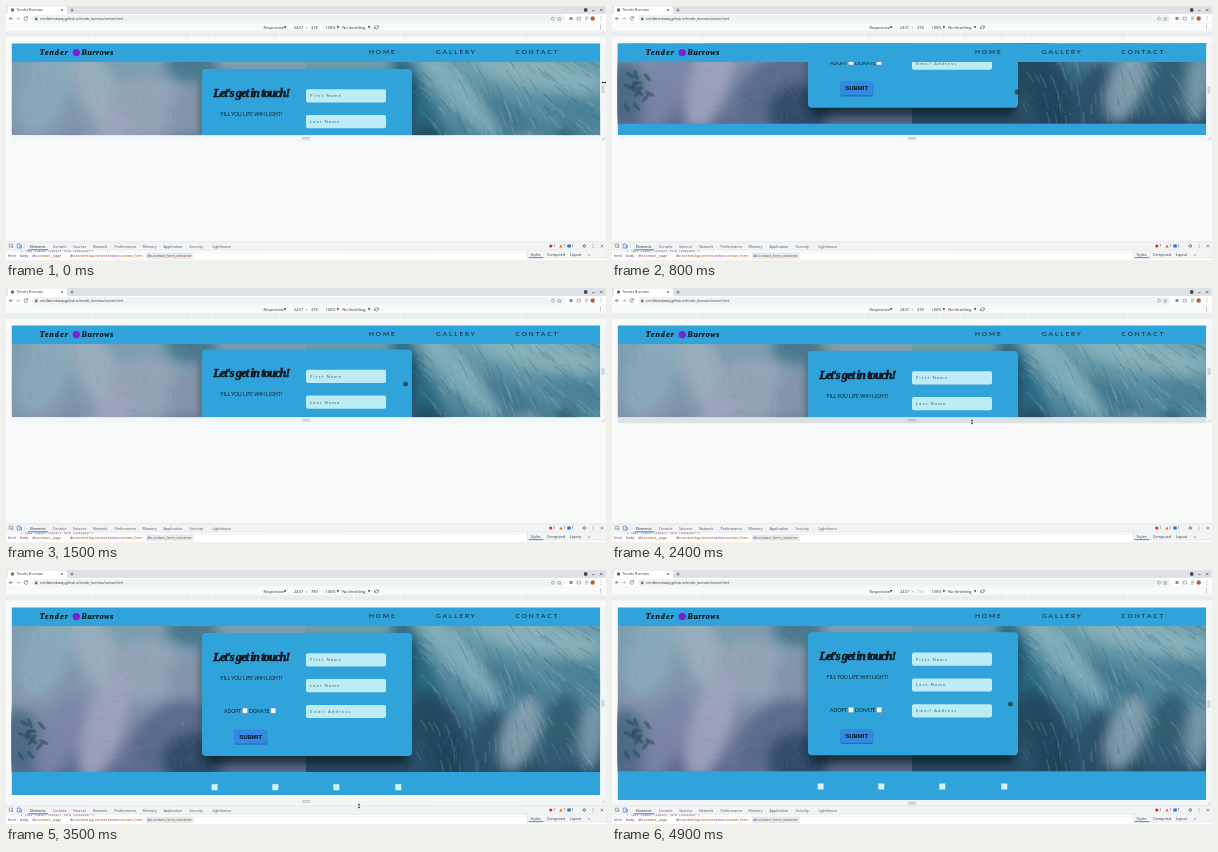
An HTML page for the animation above (5 s loop, 600 by 254 pixels).

```html
<!DOCTYPE html>
<html lang="en">
<head>
<meta charset="utf-8">
<title>Tender Burrows</title>
<style>
  html, body { margin: 0; width: 100%; height: 100%; overflow: hidden; background: #f8faf9; }
  svg { display: block; width: 100vw; height: 100vh; }
  text { font-family: "Open Sans", sans-serif; white-space: pre; }
  .lato { font-family: Lato, sans-serif; }
  .script { font-family: "Liberation Serif", serif; font-weight: bold; font-style: italic; }
  .bold { font-family: "Liberation Sans", sans-serif; font-weight: bold; }
  .mono { font-family: "DejaVu Sans Mono", monospace; }
</style>
</head>
<body>
<svg id="stage" viewBox="0 0 600 254">
  <defs>
    <clipPath id="view"><rect id="viewRect" x="5.8" y="37.5" width="588.4" height="91"/></clipPath>
    <clipPath id="photoClip"><rect x="5" y="56" width="590" height="147"/></clipPath>
    <clipPath id="codeClip"><rect x="0" y="244.2" width="521" height="2"/></clipPath>
    <filter id="soft" x="-10%" y="-20%" width="120%" height="140%"><feGaussianBlur stdDeviation="6"/></filter>
    <filter id="shade" x="-20%" y="-20%" width="140%" height="150%"><feGaussianBlur stdDeviation="6"/></filter>
    <linearGradient id="leftCoat" x2="0" y2="1">
      <stop offset="0" stop-color="#7d9fb1"/>
      <stop offset=".5" stop-color="#8495ae"/>
      <stop offset="1" stop-color="#5f6c90"/>
    </linearGradient>
    <linearGradient id="rightCoat" x2="0" y2="1">
      <stop offset="0" stop-color="#6c9fad"/>
      <stop offset=".5" stop-color="#4b8097"/>
      <stop offset="1" stop-color="#2a4d66"/>
    </linearGradient>
  </defs>
  <g id="chrome"></g>
  <g clip-path="url(#view)">
    <g id="page"></g>
    <g id="header"></g>
  </g>
  <g id="grips"></g>
  <g id="tools"></g>
  <g id="cursors"></g>
</svg>
<script>
const NS = "http://www.w3.org/2000/svg";
const $ = id => document.getElementById(id);
const BLUE = "#31a3db";

function add(parent, tag, attrs, content) {
  const node = document.createElementNS(NS, tag);
  for (const key in attrs) node.setAttribute(key, attrs[key]);
  if (content !== undefined) node.textContent = content;
  parent.appendChild(node);
  return node;
}
const rect = (g, x, y, width, height, fill, more) => add(g, "rect", { x, y, width, height, fill, ...more });
const disc = (g, cx, cy, r, fill, more) => add(g, "circle", { cx, cy, r, fill, ...more });
const oval = (g, cx, cy, rx, ry, turn, fill, more) =>
  add(g, "ellipse", { cx, cy, rx, ry, fill, transform: `rotate(${turn} ${cx} ${cy})`, ...more });
const line = (g, d, stroke, width = .6, more) =>
  add(g, "path", { d, stroke, "stroke-width": width, fill: "none", ...more });
const label = (g, x, y, size, str, fill = "#333", more) =>
  add(g, "text", { x, y, "font-size": size, fill, ...more }, str);
const caret = (g, x, y) => add(g, "path", { d: `M${x} ${y}h2.6l-1.3 2.2z`, fill: "#333" });

let seed = 11;
const rnd = () => (seed = (seed * 16807) % 2147483647) / 2147483647;

// Browser window
const chrome = $("chrome");
rect(chrome, 0, 0, 600, 8, "#dee1e6");
rect(chrome, 1.5, .6, 59.5, 8, "#fff", { rx: 1.5 });
disc(chrome, 6.5, 4, 1.7, "#666d72");
label(chrome, 10.5, 5.4, 3.6, "Tender Burrows", "#33383b");
line(chrome, "M55 3l2 2m0-2l-2 2M66 2.4v3.4M64.3 4.1h3.4", "#333", .5);
disc(chrome, 579.7, 4, 1.9, "#444a4e");
line(chrome, "M586 4.6h2.6M594 2.8l2.5 2.5m0-2.5l-2.5 2.5", "#263033", .55);
rect(chrome, 0, 8, 600, 9, "#fff");
line(chrome, "M7 12.6H3.4l1.6-1.7m-1.6 1.7L5 14.3", "#555", .6);
line(chrome, "M10 12.6h3.6L12 10.9m1.6 1.7L12 14.3", "#aaa", .6);
line(chrome, "M21.5 11.6a1.8 1.8 0 1 0 .1 1.6M21.7 10.4v1.5h-1.5", "#555", .6);
rect(chrome, 26, 9, 533, 7.2, "#f0f3f4", { rx: 3.6 });
rect(chrome, 29, 12.2, 2.4, 2, "#666");
line(chrome, "M29.5 12.3v-.7a.7.7 0 0 1 1.4 0v.7", "#666", .4);
label(chrome, 34, 13.9, 3.2, "oriellabrindaway.github.io/tender_burrows/contact.html", "#33383b");
disc(chrome, 547, 12.6, 1.5, "none", { stroke: "#777", "stroke-width": .5 });
line(chrome, "M553.3 11l.6 1.2 1.3.1-1 .9.3 1.3-1.2-.7-1.2.7.3-1.3-1-.9 1.3-.1z", "#666", .4);
rect(chrome, 563.5, 11, 3, 3, "#8a8f92");
line(chrome, "M571 11.2h3.4v2.8H571zM579 11h3.2M579 12.6h3.2M579 14.2h2", "#666", .5);
disc(chrome, 586.7, 12.5, 2.2, "#a8654a");
for (const y of [10.8, 12.6, 14.4]) disc(chrome, 595, y, .45, "#555");

// Device toolbar and breakpoint strip
rect(chrome, 0, 17, 600, 8, "#f9fbfa");
line(chrome, "M0 17H600M0 25H600", "#dfe3e4", .4);
label(chrome, 257.5, 22.5, 3.9, "Responsive");
caret(chrome, 277.8, 20.2);
label(chrome, 288, 22.5, 3.9, "2437");
label(chrome, 299.4, 22.5, 3.7, "×", "#777");
const heightLabel = label(chrome, 305, 22.5, 3.9, "");
label(chrome, 319.5, 22.5, 3.9, "100%");
caret(chrome, 330.6, 20.2);
label(chrome, 336.3, 22.5, 3.9, "No throttling");
caret(chrome, 361.8, 20.2);
line(chrome, "M368.7 20.6a1.9 1.9 0 0 1 3.5.5M372.3 22a1.9 1.9 0 0 1-3.5-.4M372.6 19.7v1.5h-1.5M368.4 23v-1.5h1.5", "#444", .5);
for (const y of [19.5, 21.2, 22.9]) disc(chrome, 594.5, y, .45, "#555");
rect(chrome, 0, 25.6, 600, 5, "#e9eded");
for (const d of [27, 48, 94, 115, 215])
  for (const x of [300 - d, 300 + d]) rect(chrome, x, 25.6, .7, 5, "#fbfcfc");

// Page: soft animal coats behind the form
const page = $("page");
const photo = add(page, "g", { "clip-path": "url(#photoClip)" });
rect(photo, 5, 56, 295, 147, "url(#leftCoat)");
rect(photo, 300, 56, 295, 147, "url(#rightCoat)");
const blurred = add(photo, "g", { filter: "url(#soft)", opacity: .85 });
const blobs = [
  [38, 85, 24, 44, 20, "#8aabbb"], [92, 84, 20, 50, -25, "#9db0be"],
  [140, 100, 36, 30, 0, "#97a5b8"], [186, 60, 26, 16, 0, "#3f7288"],
  [182, 112, 20, 28, 0, "#8494ac"], [98, 158, 20, 54, 18, "#a2a6bf"],
  [54, 166, 17, 46, 22, "#7c86a7"], [162, 164, 26, 44, 48, "#566788"],
  [186, 190, 30, 28, 0, "#2b4562"], [12, 170, 20, 30, 0, "#476880"],
  [414, 104, 15, 64, -22, "#24647e"], [452, 86, 13, 62, -40, "#86b0bb"],
  [534, 68, 66, 16, 10, "#8bb3bc"], [505, 112, 36, 9, 35, "#3d7388"],
  [574, 106, 34, 11, 28, "#4a8096"], [434, 166, 24, 50, -22, "#1f4359"],
  [478, 174, 16, 36, 25, "#2c5068"], [514, 164, 17, 38, 18, "#8ba5b3"],
  [554, 164, 18, 42, 12, "#315b71"], [586, 164, 12, 36, 8, "#7f9fad"]
];
for (const blob of blobs) oval(blurred, ...blob);

function strand(x, y, angle, length, stroke, width, opacity) {
  const dx = Math.cos(angle) * length, dy = Math.sin(angle) * length;
  line(photo, `M${x.toFixed(1)} ${y.toFixed(1)}q${(dx / 2 + 1).toFixed(1)} ${(dy / 2 - 1).toFixed(1)} ${dx.toFixed(1)} ${dy.toFixed(1)}`,
    stroke, width, { opacity });
}
for (let i = 0; i < 200; i++) {
  const x = 6 + rnd() * 190, y = 56 + rnd() * 146;
  const around = Math.atan2(y - 100, x - 140) + 1.1;
  strand(x, y, around, 5 + rnd() * 9, rnd() < .5 ? "#c3cedb" : "#5d748e", .5 + rnd() * .6, .12);
}
for (let i = 0; i < 300; i++) {
  const x = 406 + rnd() * 188, y = 50 + rnd() * 146;
  const sweep = .75 + Math.sin(x / 34) * .3 + (y - 56) / 260;
  strand(x, y, sweep, 8 + rnd() * 12, rnd() < .5 ? "#b9d5db" : "#1d5068", .6 + rnd() * 1.4, .17);
}
for (let i = 0; i < 14; i++)
  oval(photo, 8 + rnd() * 30, 152 + rnd() * 34, 1.8, 5, rnd() * 180 - 90, "#2b4d60", { opacity: .6 });
for (let i = 0; i < 30; i++) {
  const x = i % 2 ? 164 + rnd() * 32 : 408 + rnd() * 56;
  strand(x, 160 + rnd() * 38, -.3 - rnd() * 2.4, 4 + rnd() * 8, "#6c8a97", .6, .35);
}

// Form card
rect(page, 198, 72, 206, 122, "#06131d", { rx: 4, opacity: .8, filter: "url(#shade)" });
rect(page, 5, 202, 590, 30, BLUE);
rect(page, 196, 63, 210, 123, BLUE, { rx: 4 });
label(page, 207.3, 90.6, 12.4, "Let's get in touch!", "#0b1115",
  { class: "script", "letter-spacing": -.9, stroke: "#0b1115", "stroke-width": .45 });
label(page, 214.5, 109.7, 5.1, "FILL YOU LIFE WIH LIGHT!", "#10222c", { class: "lato" });
["First Name", "Last Name", "Email Address"].forEach((name, i) => {
  const y = 83.3 + i * 25.8;
  rect(page, 300, y, 80, 13.2, "#bcedf5", { rx: 2 });
  label(page, 304, y + 8.1, 4.3, name, "#3e6674", { class: "lato", "letter-spacing": 1.15 });
});
label(page, 218, 143, 5, "ADOPT", "#10222c", { class: "lato" });
label(page, 243, 143, 5, "DONATE", "#10222c", { class: "lato" });
for (const x of [236.4, 264.6])
  rect(page, x, 138, 5.2, 5.2, "#fff", { rx: .8, stroke: "#6b7d86", "stroke-width": .4 });
rect(page, 228.6, 161, 32.6, 13.8, "#1f5fae", { rx: 1.5, opacity: .75 });
rect(page, 228.2, 159.6, 32.6, 13.8, "#3489e0", { rx: 1.5 });
label(page, 233.2, 168.6, 6, "SUBMIT", "#0a1218", { class: "bold" });
for (const x of [208.6, 269.3, 330.3, 392.3]) rect(page, x - 3, 214.2, 6, 6, "#d9f0fa");

// Fixed page header
const header = $("header");
rect(header, 5, 37, 590, 19, BLUE);
label(header, 33.8, 49.2, 7.8, "Tender", "#0b1115",
  { class: "script", "letter-spacing": 1.15, stroke: "#0b1115", "stroke-width": .2 });
disc(header, 70.3, 46.6, 3.7, "#7b1fd6");
label(header, 75.6, 49.2, 7.8, "Burrows", "#0b1115",
  { class: "script", "letter-spacing": .65, stroke: "#0b1115", "stroke-width": .2 });
[[363, "HOME"], [430, "GALLERY"], [509.6, "CONTACT"]].forEach(([x, name]) =>
  label(header, x, 48.4, 6.5, name, "#0d2029", { class: "lato", "letter-spacing": 1.9 }));

// Resize grips
const grips = $("grips");
const sideBar = rect(grips, 594.2, 38, 5.8, 91, "#f3f6f6");
const sideGrip = line(grips, "M596.2-3.5v7M597.8-3.5v7", "#8d9598", .5);
const bottomGrip = add(grips, "g", {});
const bottomBar = rect(bottomGrip, 6, 0, 588, 6, "#f3f6f6");
line(bottomGrip, "M296 2.4h8M296 3.9h8", "#8d9598", .5);
line(bottomGrip, "M595.5 5l3.5-3.5M597.5 5l1.5-1.5", "#8d9598", .5);

// Developer tools
const tools = $("tools");
rect(tools, 0, 235.8, 600, 18.2, "#fff");
rect(tools, 0, 235.8, 600, 8.4, "#f1f3f4");
line(tools, "M0 235.8H600M0 244.2H600", "#cbd0d3", .4);
line(tools, "M3.2 238.2h3.4v3h-3.4zM5 239.8l2.2 2.2", "#5f6368", .5);
line(tools, "M11.2 238h2.8v4h-2.8zM14 239.4h1.5v2.6H14", "#1a73e8", .6);
line(tools, "M18.5 237.5v5", "#ccc", .4);
[[24, "Elements"], [47, "Console"], [67, "Sources"], [87, "Network"], [108.5, "Performance"],
 [136.5, "Memory"], [157.5, "Application"], [183.5, "Security"], [206.5, "Lighthouse"]].forEach(([x, name], i) =>
  label(tools, x, 241.5, 3.6, name, i ? "#50565b" : "#202427"));
rect(tools, 22.5, 243.4, 19.5, .8, "#1a73e8");
disc(tools, 544.8, 240, 1.6, "#d93025");
label(tools, 547.3, 241.4, 3.5, "1");
add(tools, "path", { d: "M553.3 241.5l1.7-3.1 1.7 3.1z", fill: "#e8710a" });
label(tools, 557.2, 241.4, 3.5, "1");
rect(tools, 561.3, 238.5, 3.5, 2.9, "#1a73e8", { rx: .4 });
label(tools, 565.8, 241.4, 3.5, "1");
disc(tools, 578.3, 240, 1.3, "none", { stroke: "#444", "stroke-width": 1, "stroke-dasharray": "1 .3" });
for (const y of [238.3, 240, 241.7]) disc(tools, 587, y, .4, "#444");
line(tools, "M594.5 238.7l2.7 2.7m0-2.7l-2.7 2.7", "#444", .5);
const code = add(tools, "g", { "clip-path": "url(#codeClip)" });
label(code, 15, 246.2, 3.2, '▸ <div class="contact_form_container">', "#7d2b78", { class: "mono" });
line(tools, "M0 246.4H521", "#dcdfe1", .4);
rect(tools, 140, 246.7, 47.5, 6.5, "#e6ebf2");
[[2, "html"], [14, "body"], [26.2, "div", ".contact__page"], [64, "div", ".content.bg-content"],
 [101.8, "section", ".contact_form"], [141.2, "div", ".contact_form_container"]].forEach(([x, tag, cls]) => {
  const crumb = label(tools, x, 251.2, 3.55, tag, "#881280");
  if (cls) add(crumb, "tspan", { fill: "#994500" }, cls);
});
rect(tools, 521.4, 244.2, 78.6, 7.8, "#f1f3f4");
line(tools, "M521.4 244.2V254M521.4 252H600", "#cbd0d3", .4);
[[524.6, "Styles"], [541, "Computed"], [563.8, "Layout"]].forEach(([x, name]) =>
  label(tools, x, 249.7, 3.7, name, "#383e42"));
label(tools, 582, 249.6, 4, "»");
rect(tools, 522.8, 251.3, 14.5, .8, "#1a73e8");

// Pointers
const cursors = $("cursors");
const touch = disc(cursors, 0, 0, 2.5, "#24323a", { opacity: .72 });
const resizer = add(cursors, "path", {
  d: "M0-2.6l1.3 1.7H.4v1.8h.9L0 2.6l-1.3-1.7h.9v-1.8h-.9z",
  fill: "#111", stroke: "#fff", "stroke-width": .25
});

// Motion tables: [ms, value...]
const LOOP = 5000, STEP = 100, SCALE = 588 / 2437;
const LAG = 35; // the page repaints slightly behind its resize handle
const scrollTrack = [[100, 0], [300, 12], [500, 48], [700, 80], [800, 84.3], [900, 84.3],
  [1000, 72], [1200, 36], [1400, 6], [1500, 1.5], [1800, 1.5], [1900, 0], [4800, 0], [4900, .7]];
const bottomTrack = [[2600, 129.2], [2700, 135], [2900, 155.5], [3200, 200], [3500, 228.3], [3600, 230]];
const pointerTrack = [[0, 598, 76.5], [200, 410, 116], [500, 405, 100], [800, 405, 86], [1000, 403, 80],
  [1300, 400, 92], [1500, 399.5, 96], [1700, 390, 122], [1900, 368, 140], [2100, 360, 134],
  [2600, 360, 134], [2900, 359.5, 170], [3200, 357, 211], [3500, 353, 236], [3800, 353, 248.5],
  [4400, 371.5, 230.5], [4500, 380, 198], [4700, 398.5, 134]];

function at(track, t, k = 1) {
  if (t <= track[0][0]) return track[0][k];
  for (let i = 1; i < track.length; i++) {
    const a = track[i - 1], b = track[i];
    if (t <= b[0]) return a[k] + (b[k] - a[k]) * (t - a[0]) / (b[0] - a[0]);
  }
  return track[track.length - 1][k];
}

function draw(t) {
  const bottom = at(bottomTrack, t);
  const x = at(pointerTrack, t), y = at(pointerTrack, t, 2);
  page.setAttribute("transform", `translate(0 ${-at(scrollTrack, t)})`);
  $("viewRect").setAttribute("height", at(bottomTrack, t - LAG) - 37.5);
  sideBar.setAttribute("height", bottom - 38);
  sideGrip.setAttribute("transform", `translate(0 ${(38 + bottom) / 2})`);
  bottomGrip.setAttribute("transform", `translate(0 ${bottom})`);
  bottomBar.setAttribute("fill", t >= 2000 && t < 2700 ? "#dbe2e6" : "#f3f6f6");
  heightLabel.textContent = Math.round((bottom - 38) / SCALE);
  heightLabel.setAttribute("fill", t >= 3800 ? "#aaa" : "#333");

  const resizing = t < 100 || (t >= 2000 && t < 3900);
  const touching = (t >= 100 && t < 2000) || t >= 4400;
  resizer.setAttribute("visibility", resizing ? "visible" : "hidden");
  touch.setAttribute("visibility", touching ? "visible" : "hidden");
  resizer.setAttribute("transform", `translate(${x} ${y})${t < 100 ? " rotate(90)" : ""}`);
  touch.setAttribute("transform", `translate(${x} ${y})`);
}

const start = performance.now();
function tick() {
  const t = (performance.now() - start) % LOOP;
  draw(Math.floor(t / STEP) * STEP);
  requestAnimationFrame(tick);
}
tick();
</script>
</body>
</html>
```
